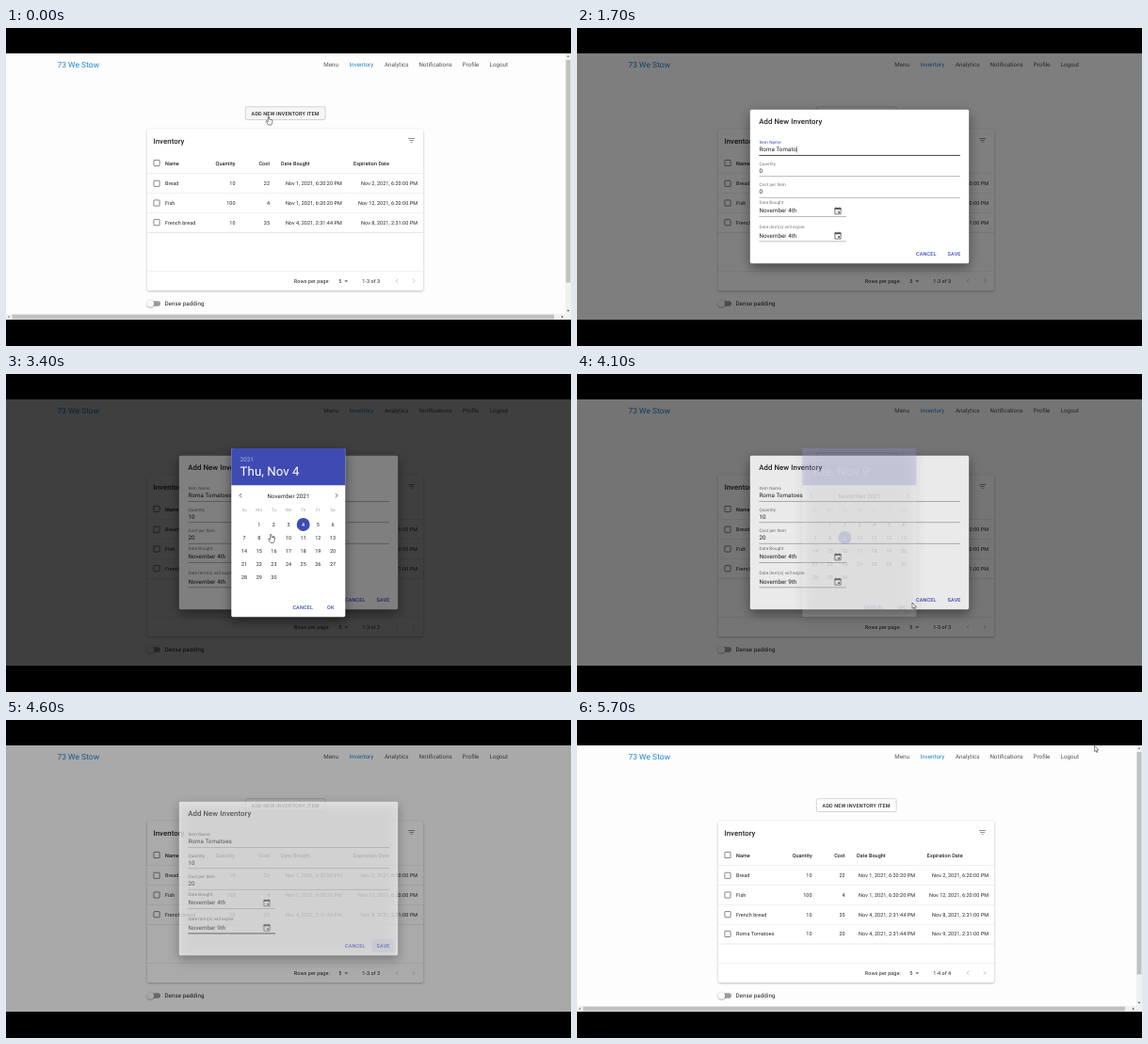
Write an HTML page with a canvas that moves like this. It is 600 px wide and 338 px high and loops after 6 s.

```html
<!DOCTYPE html>
<html lang="en">
<head>
<meta charset="utf-8">
<title>Inventory</title>
<style>
html, body { margin: 0; width: 100%; height: 100%; overflow: hidden; background: #000; }
canvas { display: block; width: 600px; height: 338px; }
</style>
</head>
<body>
<canvas id="stage"></canvas>
<script>
const canvas = document.getElementById('stage');
const ctx = canvas.getContext('2d');
const dpr = window.devicePixelRatio || 1;
canvas.width = 600 * dpr;
canvas.height = 338 * dpr;

const LOOP = 6000, STEP = 100;
const DARK = 'rgba(0,0,0,.87)', MUTED = 'rgba(0,0,0,.54)', FAINT = 'rgba(0,0,0,.28)';
const INDIGO = '#3f4bb3', LINE = '#e0e0e0';
// Type sizes: caption, body 2, body 1, heading
const XS = 4.68, SM = 5.46, MD = 6.24, LG = 7.8;

const ramp = (t, from, to) => Math.min(1, Math.max(0, (t - from) / (to - from)));

function text(str, x, y, size, color = DARK, { weight = 400, align = 'left', spacing = .01 } = {}) {
  ctx.font = `${weight} ${size}px Roboto, sans-serif`;
  ctx.letterSpacing = spacing * size + 'px';
  ctx.textAlign = align;
  ctx.fillStyle = color;
  ctx.fillText(str, x, y);
}

function rect(x, y, w, h, color) {
  ctx.fillStyle = color;
  ctx.fillRect(x, y, w, h);
}

function rounded(x, y, w, h, r, fill, stroke, lineWidth = .5) {
  ctx.beginPath();
  ctx.roundRect(x, y, w, h, r);
  if (fill) { ctx.fillStyle = fill; ctx.fill(); }
  if (stroke) { ctx.strokeStyle = stroke; ctx.lineWidth = lineWidth; ctx.stroke(); }
}

function disc(x, y, r, color) {
  ctx.beginPath();
  ctx.arc(x, y, r, 0, Math.PI * 2);
  ctx.fillStyle = color;
  ctx.fill();
}

function path(points, { fill, stroke, width = .8, close = false }) {
  ctx.beginPath();
  points.forEach(([x, y], i) => i ? ctx.lineTo(x, y) : ctx.moveTo(x, y));
  if (close) ctx.closePath();
  if (fill) { ctx.fillStyle = fill; ctx.fill(); }
  if (stroke) { ctx.strokeStyle = stroke; ctx.lineWidth = width; ctx.stroke(); }
}

// Triangle pointing along (dx, dy)
function triangle(x, y, r, dx, dy, color) {
  path([[x + dx * r, y + dy * r], [x - dx * r * .2 + dy * r, y - dy * r * .2 + dx * r],
    [x - dx * r * .2 - dy * r, y - dy * r * .2 - dx * r]], { fill: color, close: true });
}

function chevron(x, y, dir, color) {
  path([[x - dir, y - 2.1], [x + dir * 1.1, y], [x - dir, y + 2.1]], { stroke: color, width: .8 });
}

function withShadow(blur, dy, color, draw) {
  ctx.save();
  ctx.shadowBlur = blur * dpr;
  ctx.shadowOffsetY = dy * dpr;
  ctx.shadowColor = color;
  draw();
  ctx.restore();
}

function withAlpha(alpha, draw) {
  ctx.save();
  ctx.globalAlpha = alpha;
  draw();
  ctx.restore();
}

const items = [
  ['Bread', '10', '22', 'Nov 1, 2021, 6:20:20 PM', 'Nov 2, 2021, 6:20:00 PM'],
  ['Fish', '100', '4', 'Nov 1, 2021, 6:20:20 PM', 'Nov 12, 2021, 6:20:00 PM'],
  ['French bread', '10', '35', 'Nov 4, 2021, 2:31:44 PM', 'Nov 8, 2021, 2:31:00 PM'],
  ['Roma Tomatoes', '10', '20', 'Nov 4, 2021, 2:31:44 PM', 'Nov 9, 2021, 2:31:00 PM']
];

// Right edges of number columns, then left/right edges of the date columns
const narrow = { qty: 243.5, cost: 280, bought: [292, 356.8], expires: [369, 437] };
const wide = { qty: 249.6, cost: 284.7, bought: [297, 359], expires: [371.8, 437] };

function drawNav() {
  text('73 We Stow', 54.4, 42.1, 8.5, '#1f84d0', { spacing: 0 });
  [['Menu', 337.2], ['Inventory', 364.6], ['Analytics', 402], ['Notifications', 438.4], ['Profile', 484.6], ['Logout', 513.6]]
    .forEach(([label, x]) => text(label, x, 41.1, MD, label === 'Inventory' ? '#1f84d0' : '#555', { spacing: 0 }));
}

function drawTable(count, pointer) {
  const cols = count > 3 ? wide : narrow;
  const right = { align: 'right' }, bold = { weight: 500 };
  const checkbox = y => rounded(156.9, y - 3.1, 6.2, 6.2, .6, null, 'rgba(0,0,0,.6)', .8);

  withShadow(2.5, .8, 'rgba(0,0,0,.3)', () => rounded(150, 107.3, 293, 171.7, 1.6, '#fff'));
  text('Inventory', 156.4, 122.6, LG, DARK, bold);
  [[7, 117.1], [4.7, 119.1], [1.6, 121]].forEach(([w, y]) => rect(430.6 - w / 2, y, w, .8, MUTED));

  checkbox(143.5);
  text('Name', 169, 145.5, SM, DARK, bold);
  text('Quantity', cols.qty, 145.5, SM, DARK, { weight: 500, align: 'right' });
  text('Cost', cols.cost, 145.5, SM, DARK, { weight: 500, align: 'right' });
  text('Date Bought', cols.bought[0], 145.5, SM, DARK, bold);
  text('Expiration Date', cols.expires[0], 145.5, SM, DARK, bold);
  rect(150, 154.3, 293, .5, LINE);

  items.slice(0, count).forEach(([name, qty, cost, bought, expires], i) => {
    const mid = 165.3 + 20.7 * i, base = mid + 2;
    const hovered = pointer && Math.abs(pointer.y - mid) < 10.35 && pointer.x > 150 && pointer.x < 443;
    if (hovered) rect(150, mid - 10.3, 293, 20.6, '#f4f3f4');
    checkbox(mid);
    text(name, 169, base, SM);
    text(qty, cols.qty, base, SM, DARK, right);
    text(cost, cols.cost, base, SM, DARK, right);
    text(bought, cols.bought[1], base, SM, DARK, right);
    text(expires, cols.expires[1], base, SM, DARK, right);
    rect(150, mid + 10.2, 293, i === count - 1 ? .8 : .5, LINE);
  });

  rect(150, 258.2, 293, .5, LINE);
  text('Rows per page:', 305.8, 270.8, SM);
  text('5', 353.2, 270.8, SM);
  triangle(361.3, 268.7, 1.9, 0, 1, MUTED);
  text(`1-${count} of ${count}`, 378.3, 270.8, SM);
  chevron(415.3, 268.8, -1, FAINT);
  chevron(433, 268.8, 1, FAINT);
}

function drawPage(count, pointer, scrollbars) {
  rect(0, 27, 600, 283, '#fdfdfd');
  drawNav();
  const hot = pointer && pointer.y < 98 && pointer.y > 83 && pointer.x > 254 && pointer.x < 340;
  rounded(254.3, 83.7, 84.8, 13.8, 1.6, hot ? '#f6f6f6' : '#fff', 'rgba(0,0,0,.27)', .6);
  text('ADD NEW INVENTORY ITEM', 260.6, 92.7, SM, DARK, { weight: 500, spacing: .0286 });
  drawTable(count, pointer);

  rounded(150.6, 290.3, 13.4, 5.5, 2.75, '#9b9b9b');
  withShadow(1.5, .6, 'rgba(0,0,0,.45)', () => disc(153.4, 293, 3.8, '#fafafa'));
  text('Dense padding', 168.4, 295.2, MD);

  if (!scrollbars) return;
  rect(594, 27, 6, 283, '#f1f1f1');
  rect(0, 304, 600, 6, '#f1f1f1');
  rect(594.6, 34, 4.8, 236.5, '#c1c1c1');
  rect(6.5, 304.6, 575.5, 4.8, '#c1c1c1');
  triangle(597, 30.5, 1.5, 0, -1, '#777');
  triangle(597, 300, 1.5, 0, 1, '#555');
  triangle(3.3, 307, 1.5, -1, 0, '#888');
  triangle(590.3, 307, 1.5, 1, 0, '#555');
}

function formState(t) {
  const name = 'Roma Tomatoes'.slice(0, Math.round(11 * ramp(t, 700, 1700) + 2 * ramp(t, 1700, 1900)));
  const focus = t < 600 ? '' : t < 2000 ? 'name' : t < 2200 ? 'qty' : t < 3300 ? 'cost' : t < 4200 ? '' : 'expires';
  return {
    name, focus,
    qty: t < 2100 ? '0' : '10',
    cost: t < 2600 ? '0' : t < 2700 ? '2' : '20',
    expires: t < 4000 ? 'November 4th' : 'November 9th',
    saving: t >= 4400
  };
}

function calendarIcon(x, y) {
  path([[x - 3.1, y - 2.7], [x + 3.1, y - 2.7], [x + 3.1, y + 3.5], [x - 3.1, y + 3.5]], { stroke: '#555', close: true });
  rect(x - 3.4, y - 3.1, 6.8, 1.7, '#555');
  rect(x - 2.3, y - 4, .8, 1, '#555');
  rect(x + 1.5, y - 4, .8, 1, '#555');
  rect(x + .2, y + .6, 1.8, 1.8, '#555');
}

function field(label, value, y, { end = 407, focused = false, lineColor = INDIGO, labelColor = INDIGO } = {}) {
  text(label, 193.4, y - 7.9 - (end < 300 ? 1.8 : 0), XS, focused ? labelColor : MUTED);
  text(value, 193.4, y, MD, DARK);
  rect(193.4, y + 3.9 - (focused ? .2 : 0), end - 193.4, focused ? 1 : .6, focused ? lineColor : '#8a8a8a');
}

function drawDialog(form) {
  withShadow(12, 4, 'rgba(0,0,0,.45)', () => rounded(183.8, 86.8, 232.4, 163.4, 1.6, '#fff'));
  text('Add New Inventory', 193.2, 102.1, LG, DARK, { weight: 500 });

  field('Item Name', form.name, 131.2, { focused: form.focus === 'name', lineColor: '#444' });
  if (form.focus === 'name') rect(193.6 + ctx.measureText('').width + nameWidth(form.name), 125.8, .5, 6.6, DARK);
  field('Quantity', form.qty, 153.6, { focused: form.focus === 'qty' });
  field('Cost per Item', form.cost, 176, { focused: form.focus === 'cost' });
  if (form.focus === 'qty') spinner(151.6);
  if (form.focus === 'cost') spinner(174);
  field('Date Bought', 'November 4th', 196.4, { end: 286 });
  field('Date item(s) will expire', form.expires, 222.7,
    { end: 286, focused: form.focus === 'expires', lineColor: '#333', labelColor: MUTED });
  calendarIcon(277, 194.3);
  calendarIcon(277, 220.6);

  if (form.saving) rounded(388.6, 233, 24, 14, 1.6, 'rgba(63,75,179,.08)');
  text('CANCEL', 360, 242.2, SM, INDIGO, { weight: 500, spacing: .0286 });
  text('SAVE', 393.6, 242.2, SM, INDIGO, { weight: 500, spacing: .0286 });
}

function nameWidth(name) {
  ctx.font = `400 ${MD}px Roboto, sans-serif`;
  ctx.letterSpacing = .01 * MD + 'px';
  return ctx.measureText(name).width;
}

function spinner(y) {
  rect(401.4, y - 3.6, 5, 7.2, '#efefef');
  triangle(403.9, y - 1.5, 1.3, 0, -1, '#444');
  triangle(403.9, y + 1.5, 1.3, 0, 1, '#444');
}

function drawPicker(day) {
  const center = { align: 'center' };
  const column = i => 253.1 + 15.65 * i;
  withShadow(12, 4, 'rgba(0,0,0,.5)', () => rounded(239.3, 79, 121, 179.2, 1.6, '#fff'));
  rounded(239.3, 79, 121, 39.2, [1.6, 1.6, 0, 0], INDIGO);
  text('2021', 248.8, 92.5, MD, 'rgba(255,255,255,.6)');
  text(day === 4 ? 'Thu, Nov 4' : 'Tue, Nov 9', 248.6, 108.4, 13.26, '#fff', { spacing: .003 });

  text('November 2021', 300, 131.6, MD, DARK, center);
  chevron(249, 129.2, -1, '#444');
  chevron(351, 129.2, 1, '#444');
  ['Su', 'Mo', 'Tu', 'We', 'Th', 'Fr', 'Sa'].forEach((d, i) => text(d, column(i), 146.4, XS, 'rgba(0,0,0,.36)', center));
  for (let d = 1; d <= 30; d++) {
    const x = column(d % 7), y = 160 + 14.05 * Math.floor(d / 7);
    if (d === day) disc(x, y, 7, INDIGO);
    text(d, x, y + 2, SM, d === day ? '#fff' : DARK, { align: 'center', weight: d === day ? 500 : 400 });
  }
  text('CANCEL', 304.4, 249.6, SM, INDIGO, { weight: 500, spacing: .0286 });
  text('OK', 341, 249.6, SM, INDIGO, { weight: 500, spacing: .0286 });
}

// Each leg: cursor kind, then time, x, y stops
const legs = [
  ['hand', [0, 279, 94], [200, 279, 94]],
  ['arrow', [300, 277, 98], [700, 258, 126]],
  ['arrow', [2900, 330, 186], [3200, 279, 217]],
  ['hand', [3300, 278, 217], [3400, 281.4, 170.4], [3600, 283, 172], [3800, 344, 244], [4000, 345, 245]],
  ['arrow', [4100, 356, 243], [4300, 385, 239]],
  ['arrow', [4700, 337, 231], [4900, 344, 222], [5300, 431, 109], [5700, 549.6, 27.3], [6000, 549.6, 27.3]]
];

function pointerAt(t) {
  for (const [kind, ...stops] of legs) {
    for (let i = 1; i < stops.length; i++) {
      const [t0, x0, y0] = stops[i - 1], [t1, x1, y1] = stops[i];
      if (t < t0 || t > t1) continue;
      const k = ramp(t, t0, t1);
      return { kind, x: x0 + (x1 - x0) * k, y: y0 + (y1 - y0) * k };
    }
  }
  return null;
}

function drawPointer({ kind, x, y }) {
  ctx.save();
  ctx.translate(x, y);
  ctx.lineJoin = 'round';
  const shape = kind === 'hand'
    ? [[-.7, 0], [.4, 0], [.6, 3], [3.6, 3.7], [4, 4.6], [3.6, 7], [2.9, 9], [-.5, 9], [-3, 5.2], [-2.4, 4.6], [-.9, 5.8]]
    : [[0, 0], [0, 6.2], [1.4, 5], [2.4, 7.2], [3.3, 6.8], [2.4, 4.7], [4.3, 4.5]];
  path(shape, { fill: '#fff', stroke: '#333', width: .6, close: true });
  ctx.restore();
}

function scrim(alpha) {
  withAlpha(alpha, () => rect(0, 27, 600, 283, 'rgba(0,0,0,.5)'));
}

function draw(t) {
  const dialog = ramp(t, 150, 350) * (1 - ramp(t, 4550, 4700));
  const picker = ramp(t, 3250, 3400) * (1 - ramp(t, 3950, 4130));
  const pointer = pointerAt(t);

  ctx.setTransform(dpr, 0, 0, dpr, 0, 0);
  ctx.textRendering = 'geometricPrecision';
  rect(0, 0, 600, 338, '#000');
  drawPage(t < 4700 ? 3 : 4, dialog ? null : pointer, !dialog);
  if (dialog) {
    scrim(dialog);
    withAlpha(dialog, () => drawDialog(formState(t)));
  }
  if (picker) {
    scrim(picker);
    withAlpha(picker, () => drawPicker(t < 3500 ? 4 : 9));
  }
  if (pointer) drawPointer(pointer);
}

function tick() {
  const t = performance.now() % LOOP;
  draw(Math.floor(t / STEP) * STEP);
  requestAnimationFrame(tick);
}
tick();
</script>
</body>
</html>
```
